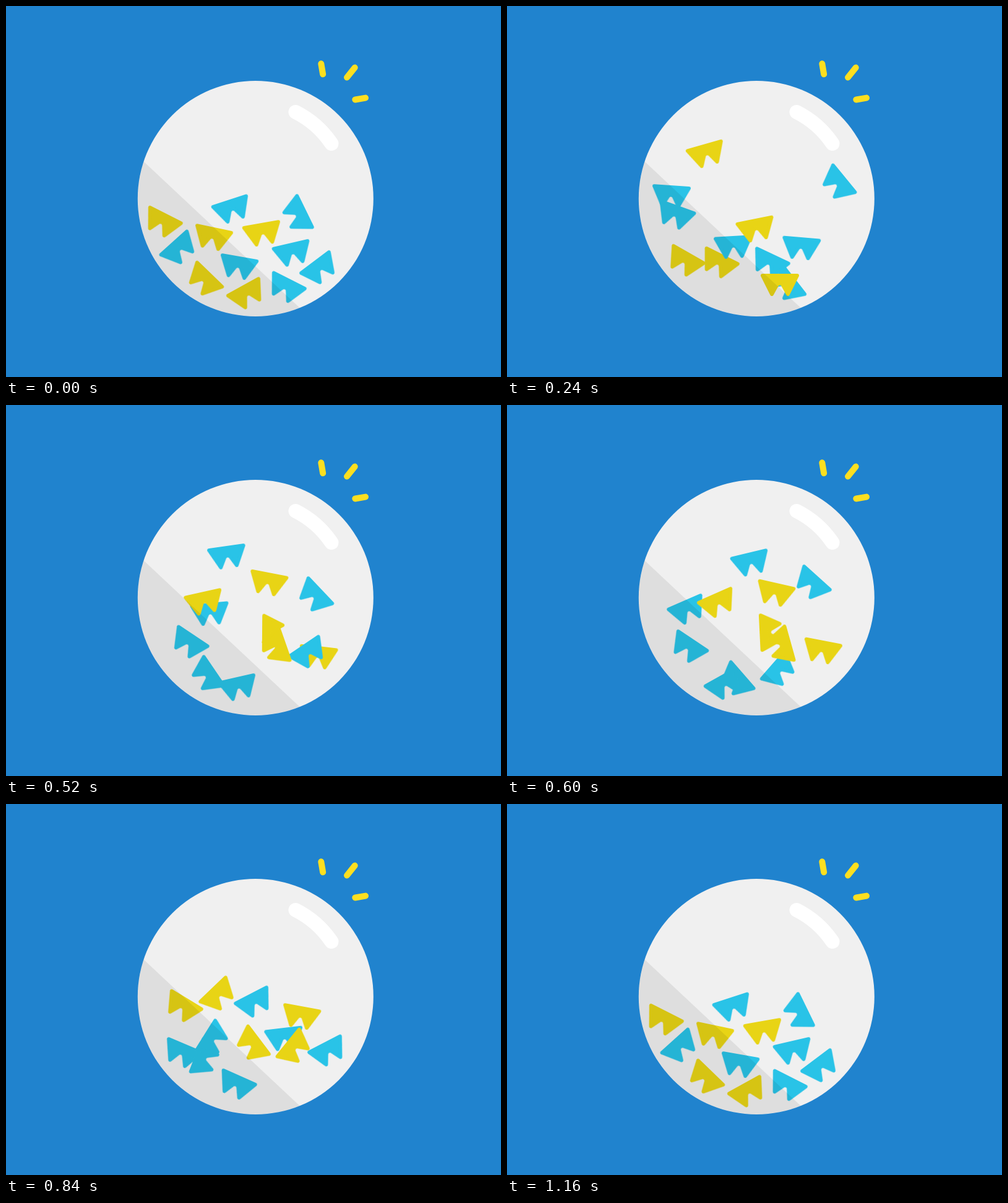
An HTML page that plays this animation: 800x600 px, repeating every 1200 ms.

```html
<!DOCTYPE html>
<html lang="en">
<head>
<meta charset="utf-8">
<title>Tumbling globe</title>
<style>
  html, body { margin: 0; width: 100%; height: 100%; overflow: hidden; background: #2083ce; }
  svg { display: block; width: 100%; height: 100%; }
  .piece { stroke-width: 6; stroke-linejoin: round; }
  .line { fill: none; stroke-linecap: round; }
</style>
</head>
<body>
<svg viewBox="0 0 800 600">
  <circle cx="403.3" cy="311.5" r="190.5" fill="#f0f0f0"/>
  <g id="pieces"></g>
  <path d="M222.5 251.5 L474.5 488 A190.5 190.5 0 0 1 222.5 251.5Z" fill="#000" opacity=".075"/>
  <path class="line" d="M468 171.5 A153 153 0 0 1 526 222.5" stroke="#fff" stroke-width="23"/>
  <path class="line" d="M509.3 93.3 L512.2 110.3 M551 115.5 L563.7 99.6 M564.3 151.5 L581 148.6"
        stroke="#fddf20" stroke-width="10"/>
</svg>
<script>
const LOOP = 1200, STEP = 40, BEATS = LOOP / STEP, LANDED = BEATS - 1;
const BLUE = '#29c3e7', YELLOW = '#e8d415';
const SHAPE = 'M-28-15L28-15L13 15L5.2 .7A5.8 5.8 0 0 0-5.2 .7L-13 15Z';
const layer = document.getElementById('pieces');

// Smooth curve through values v at the given beats
function spline(beats, v) {
  const last = beats.length - 1;
  const gap = i => beats[i + 1] - beats[i];
  const rate = i => (v[i + 1] - v[i]) / gap(i);
  const slope = i => i === 0 ? rate(0) : i === last ? rate(last - 1)
    : (rate(i - 1) * gap(i) + rate(i) * gap(i - 1)) / (gap(i - 1) + gap(i));

  return beat => {
    let i = 0;
    while (i < last - 1 && beat >= beats[i + 1]) i++;
    const u = Math.min(1, (beat - beats[i]) / gap(i)), w = 1 - u;
    return v[i] * w * w * (1 + 2 * u) + v[i + 1] * u * u * (3 - 2 * u)
      + gap(i) * u * w * (slope(i) * w - slope(i + 1) * u);
  };
}

// A piece leaves its rest pose, flies through a few turning points and lands
// where it began. Its tilt is one rocking cycle: sway to both sides, lean to one.
function tumble(color, x, y, tilt, sway, lean, ...turns) {
  const points = [[x, y], ...turns, [x, y]];
  const beats = turns.length === 3 ? [0, 6, 13, 21, LANDED] : [0, 6, 13, 17, 21, LANDED];
  const [atX, atY] = [0, 1].map(axis => spline(beats, points.map(p => p[axis])));

  const piece = document.createElementNS('http://www.w3.org/2000/svg', 'path');
  piece.setAttribute('class', 'piece');
  piece.setAttribute('d', SHAPE);
  piece.setAttribute('fill', color);
  piece.setAttribute('stroke', color);
  layer.append(piece);

  const frames = Array.from({ length: BEATS + 1 }, (_, beat) => {
    const phase = 2 * Math.PI * Math.min(1, beat / LANDED);
    const angle = tilt + sway * Math.sin(phase) + lean * (1 - Math.cos(phase));
    return {
      offset: beat / BEATS,
      easing: 'step-end',
      transform: `translate(${atX(beat).toFixed(2)}px, ${atY(beat).toFixed(2)}px) rotate(${angle.toFixed(2)}deg)`
    };
  });
  piece.animate(frames, { duration: LOOP, iterations: Infinity });
}

// Back to front
tumble(YELLOW, 318.6, 445.3, 44, -6, -16, [341, 418], [423, 289], [421, 328], [284, 330]);
tumble(BLUE, 366, 330.5, -18, 13, 3, [366, 390], [358, 246], [426, 279], [403, 323]);
tumble(BLUE, 281.5, 394.6, -42, 15, 43, [265, 308], [497, 311], [471, 284], [450, 380]);
tumble(BLUE, 375, 422.8, 10, 1, 12, [271, 340], [294, 387], [283, 405]);
tumble(BLUE, 451, 457.8, 27, 17, 12, [452, 453], [323, 439], [413, 455], [371, 456]);
tumble(BLUE, 508.6, 427, -37, 39, 6, [475, 392], [376, 458], [323, 412]);
tumble(YELLOW, 415, 368.8, -10, -9, 10, [403, 362], [504, 408], [476, 345]);
tumble(BLUE, 463.4, 401, -13, 42, -3, [423, 418], [330, 338], [271, 338], [336, 382]);
tumble(BLUE, 469, 339, 64, 28, -55, [533, 289], [490, 403], [412, 447], [522, 402]);
tumble(YELLOW, 251, 352, 27, 1, -60, [323, 241], [432, 369], [345, 311]);
tumble(YELLOW, 333.4, 375.7, 12, -5, 31, [286, 415], [435, 391], [396, 391]);
tumble(YELLOW, 390.8, 468, -29, 27, 4, [441, 451], [321, 320], [468, 396]);
</script>
</body>
</html>
```
